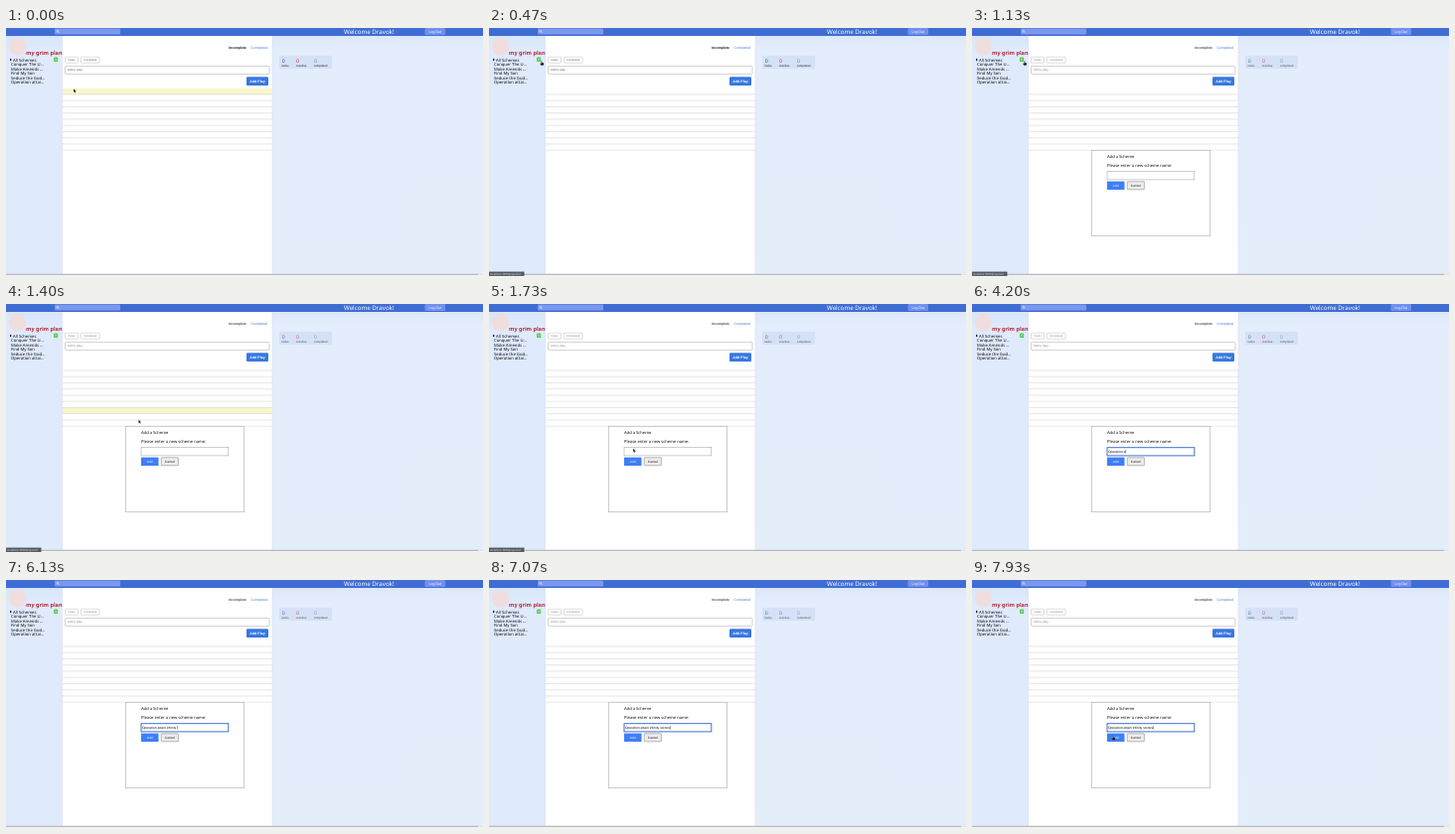
Write an HTML page that moves like this. It is 480 by 250 pixels and loops after 8 s.

```html
<!DOCTYPE html>
<html lang="en">
<head>
<meta charset="utf-8">
<title>Scheme list</title>
<style>
html, body { margin: 0; width: 100%; height: 100%; overflow: hidden; background: #fff; }
svg { display: block; width: 100vw; height: 100vh; }
text { font-family: "Liberation Sans", sans-serif; text-rendering: geometricPrecision; white-space: pre; }
.ui { font-family: "Noto Sans", "Open Sans", sans-serif; }
.bold { font-weight: 700; }
.mid { text-anchor: middle; }
</style>
</head>
<body>
<svg id="stage" viewBox="0 0 480 250" preserveAspectRatio="none">
  <defs>
    <linearGradient id="side" x2="0" y2="1">
      <stop offset="0" stop-color="#d9e6fa"/><stop offset=".06" stop-color="#dfeafc"/><stop offset="1" stop-color="#dfeafc"/>
    </linearGradient>
    <linearGradient id="pane" x2="0" y2="1">
      <stop offset="0" stop-color="#dde8fa"/><stop offset=".06" stop-color="#e3edfb"/><stop offset="1" stop-color="#e4eefb"/>
    </linearGradient>
  </defs>
  <rect width="480" height="250" fill="#fff"/>
  <rect y="8" width="56.5" height="240" fill="url(#side)"/>
  <rect x="268" y="8" width="212" height="240" fill="url(#pane)"/>
  <path d="M56.5 8V248M268 8V248" stroke="#ced9ec" stroke-width=".5"/>
  <rect id="hover" x="57" width="211" height="6.25" fill="#f8f6cc"/>
  <g id="lines" stroke="#cfcfcf" stroke-width=".5"></g>
  <rect width="480" height="8" fill="#406dd3"/>
  <rect x="49" y=".5" width="66" height="6" rx="1" fill="#7c97ee"/>
  <g fill="none" stroke="#fff" stroke-width=".5"><circle cx="51.8" cy="3.2" r=".9"/><path d="M52.5 3.9l1 1"/></g>
  <rect x="421.5" y="0" width="20.5" height="7" rx="1" fill="#7190ee"/>
  <circle cx="11.5" cy="18.8" r="8.8" fill="#f0dedf"/>
  <path d="M4 30.5l1.9 1.5l-1.9 1.5z" fill="#111"/>
  <rect x="48" y="29.6" width="4.2" height="4.4" rx=".8" fill="#5ccb58"/>
  <path d="M50.1 30.7v2.2M49 31.8h2.2" stroke="#b9efb4" stroke-width=".5"/>
  <g fill="#fff" stroke="#b4b4b4" stroke-width=".45">
    <rect x="59.5" y="29.2" width="13" height="6" rx=".8"/>
    <rect x="75.3" y="29.2" width="18.8" height="6" rx=".8"/>
    <rect x="59.5" y="38.4" width="205.5" height="8" rx=".8" stroke="#9a9a9a"/>
  </g>
  <rect x="242" y="49.2" width="22" height="8.7" rx="1" fill="#3878e0"/>
  <rect x="275" y="27.8" width="53" height="13.2" rx="1.5" fill="#d5e1f7"/>
  <g id="page"></g>
  <g id="faint"></g>
  <rect y="247.8" width="475" height="1.3" fill="#b4b7bd"/>
  <rect x="475" y="247.8" width="5" height="1.3" fill="#dfe2e8"/>
  <rect y="249.1" width="480" height=".9" fill="#f1f2f4"/>
  <g id="status"><rect y="245.6" width="35.5" height="4.4" fill="#555a62"/></g>
  <g id="dialog">
    <rect x="120.3" y="123.3" width="119.4" height="86.4" fill="#fff" stroke="#b5b5b5" stroke-width=".7"/>
    <rect id="field" x="136" y="144.7" width="87.8" height="8.2" fill="#fff"/>
    <rect x="136" y="154.6" width="17.5" height="8.4" fill="#3d7ff5"/>
    <rect x="156.2" y="154.8" width="17.2" height="8" rx=".4" fill="#ededed" stroke="#777" stroke-width=".5"/>
  </g>
  <path id="caret" stroke="#111" stroke-width=".4"/>
  <g id="mouse">
    <path id="arrow" d="M0 0V3.8L.9 3L1.6 4.4L2.2 4.1L1.6 2.8H2.8Z" fill="#111" stroke="#fff" stroke-width=".2"/>
    <path id="beam" d="M-.9-2H.9M0-2V2M-.9 2H.9" stroke="#222" stroke-width=".5" fill="none"/>
    <path id="hand" d="M-.4 0Q0-.5 .4 0V1.5L2 1.9Q2.4 2.1 2.3 3L1.8 4.4H-.5L-1.7 2.7L-1.2 2.2L-.4 2.8Z" fill="#111" stroke="#fff" stroke-width=".2"/>
  </g>
</svg>
<script>
const NS = "http://www.w3.org/2000/svg";
const LOOP = 8000, OPEN = 1130, FOCUS = 2070, ROW_TOP = 60.7, ROW_H = 6.25;
const el = id => document.getElementById(id);

function make(parent, tag, attrs) {
  const node = document.createElementNS(NS, tag);
  for (const k in attrs) node.setAttribute(k, attrs[k]);
  return el(parent).appendChild(node);
}
function label(parent, str, x, y, size, fill = "#111", cls = "") {
  const node = make(parent, "text", { x, y, "font-size": size, fill, class: cls });
  node.textContent = str;
  return node;
}
const show = (id, on) => el(id).setAttribute("visibility", on ? "visible" : "hidden");

for (let i = 1; i <= 10; i++) {
  const y = ROW_TOP + ROW_H * i;
  make("lines", "path", { d: `M57 ${y}H268` });
}

label("page", "Welcome Dravok!", 340, 5.7, 6.2, "#fff", "ui");
label("page", "Log Out", 431.8, 4.8, 3.5, "#fff", "mid");
label("page", "my grim plan", 20, 27.2, 5.5, "#b52a3c", "ui bold");
["All Schemes", "Conquer The U...", "Make Amends ...", "Find My Son", "Seduce the God...", "Operation attai..."]
  .forEach((s, i) => label("page", s, i ? 5 : 7, 33.7 + i * 4.5, 4.2, "#111", "ui"));
label("page", "Add Play", 253, 54.9, 3.6, "#fff", "bold mid");
label("page", "Completed", 246.6, 21.3, 3.4, "#3b76d8");

label("faint", "Incomplete", 224, 21.3, 3.4, "#111", "bold");
label("faint", "Dates", 66, 33.2, 2.7, "#555", "mid");
label("faint", "Completed", 84.7, 33.2, 2.7, "#555", "mid");
label("faint", "Add a play...", 62, 43.3, 3.1, "#666");
[["tasks", 277.5, "#3c4c86"], ["overdue", 291.7, "#d0303a"], ["completed", 309.7, "#7787a8"]]
  .forEach(([s, x, color]) => {
    label("faint", "0", x + .2, 34.7, 5.2, color);
    label("faint", s, x, 38.5, 3, "#222");
  });

label("status", "localhost:3000/projects#", 1, 248.8, 2.9, "#dadde2");

label("dialog", "Add a Scheme", 136, 131, 4.1, "#111", "ui");
label("dialog", "Please enter a new scheme name:", 136, 139.6, 4.1, "#111", "ui");
label("dialog", "Add", 144.7, 160, 3.2, "#fff", "mid");
label("dialog", "Cancel", 164.8, 160, 3.2, "#111", "mid");
const typed = label("dialog", "", 136.9, 149.9, 3.36);

// Each burst: text, time of its first key, time of its last key.
const bursts = [
  ["Oper", 2870, 3200], ["a", 3400, 3400], ["tion", 3670, 3870], [" a", 4070, 4130],
  ["tt", 4400, 4470], ["ai", 4670, 4730], ["n", 4870, 4870], [" ", 5070, 5070],
  ["infinity", 5270, 5930], [" ", 6130, 6130], ["s", 6270, 6270], ["tone", 6470, 6800], ["s", 7070, 7070]
];
const keys = bursts.flatMap(([s, from, to]) =>
  [...s].map((c, i) => [c, from + (s.length > 1 ? (to - from) * i / (s.length - 1) : 0)]));

const path = [
  [0, 68, 61.3], [70, 68, 61.3], [270, 58, 44], [400, 53, 33.4], [730, 52.5, 33], [1130, 52.5, 33],
  [1400, 133.3, 116.3], [1600, 147, 143], [1870, 143, 148.4], [7400, 104, 161],
  [7530, 122, 161], [7730, 142, 157], [8000, 142, 157]
];
function mouseAt(t) {
  let i = 1;
  while (i < path.length - 1 && path[i][0] <= t) i++;
  const [t0, x0, y0] = path[i - 1], [t1, x1, y1] = path[i];
  const k = Math.max(0, Math.min(1, (t - t0) / (t1 - t0)));
  return [x0 + (x1 - x0) * k, y0 + (y1 - y0) * k];
}

function draw(t) {
  const open = t >= OPEN, focused = t >= FOCUS;
  const hidden = t >= 2870 && t < 7400;
  const [mx, my] = mouseAt(t);

  // The row highlight trails the pointer slightly.
  const [hx, hy] = mouseAt(t - 33);
  const row = Math.floor((hy - ROW_TOP + .8) / ROW_H);
  const blocked = open && hx > 120 && hy > 123;
  const hover = hx > 57 && hx < 268 && row >= 0 && row < 10 && !blocked && t < 2000;
  show("hover", hover);
  if (hover) el("hover").setAttribute("y", ROW_TOP + row * ROW_H);

  show("status", t >= 400 && t < 4070);
  show("dialog", open);
  el("faint").setAttribute("opacity", open ? .75 : 1);
  el("field").setAttribute("stroke", focused ? "#3f70cf" : "#9a9a9a");
  el("field").setAttribute("stroke-width", focused ? 1 : .5);

  typed.textContent = keys.filter(k => k[1] <= t).map(k => k[0]).join("");
  const cx = 137.1 + (typed.textContent ? typed.getComputedTextLength() : 0);
  el("caret").setAttribute("d", `M${cx} 146.9V150.7`);
  show("caret", focused && (t < 2600 || t >= 2870));

  const beam = t >= 1750 && t < 2870;
  const hand = (t >= 400 && t < 1160) || t >= 7650;
  el("mouse").setAttribute("transform", `translate(${mx} ${my})`);
  show("beam", !hidden && beam);
  show("hand", !hidden && hand);
  show("arrow", !hidden && !beam && !hand);
}

const start = performance.now();
function tick() {
  draw((performance.now() - start) % LOOP);
  requestAnimationFrame(tick);
}
tick();
</script>
</body>
</html>
```
